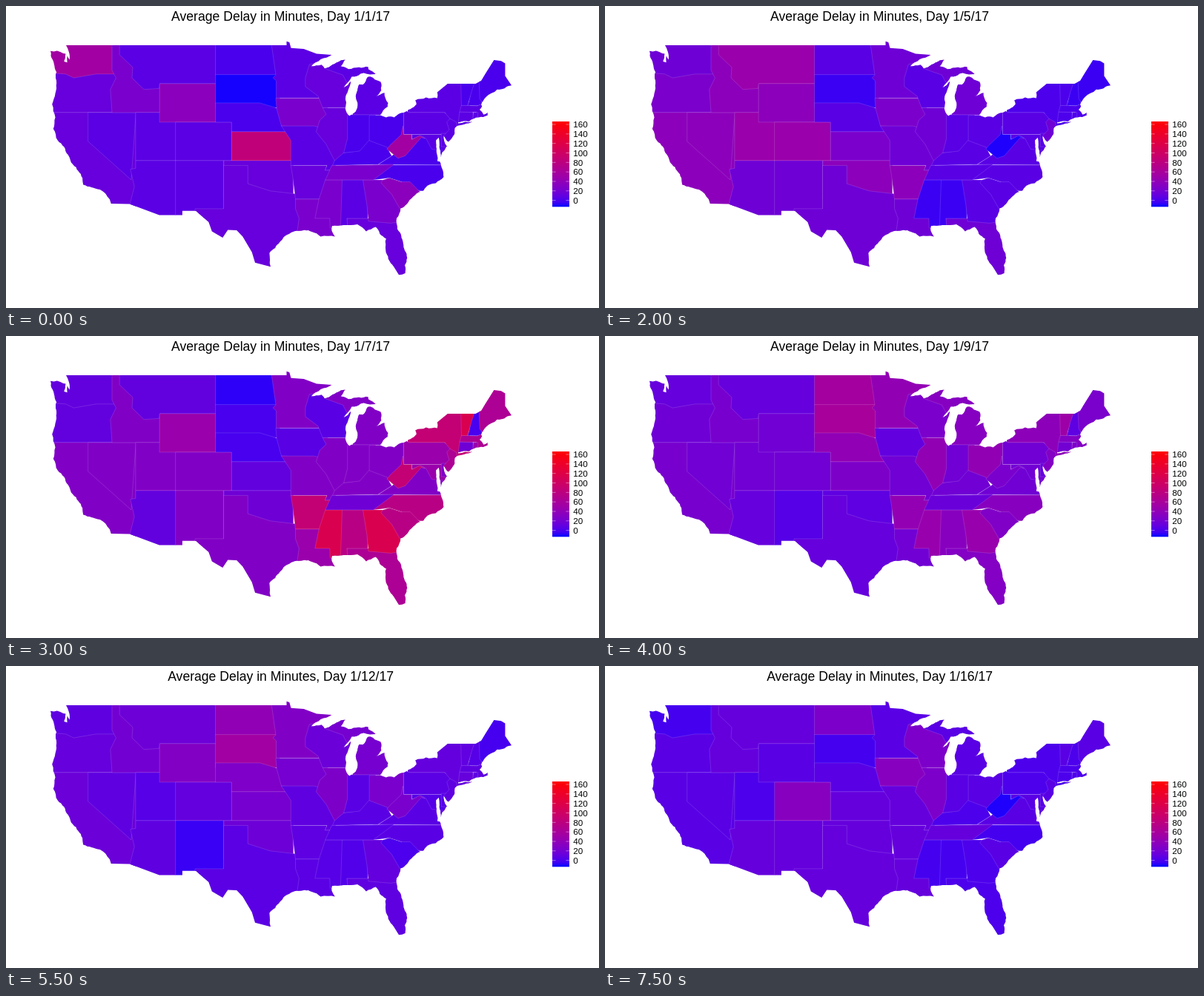
Animation, 800 px wide and 408 px high, one loop 8000 ms. Source, as an HTML page:

```html
<!DOCTYPE html>
<html lang="en">
<head>
<meta charset="utf-8">
<title>Average Delay in Minutes</title>
<style>
  html, body { margin: 0; width: 100%; height: 100%; overflow: hidden; background: #fff; }
  svg { display: block; width: 800px; height: 408px; }
  text { font-family: "Liberation Sans", Arial, sans-serif; fill: #000; }
  #title { font-size: 17.6px; text-anchor: middle; }
  #legend text { font-size: 11.73px; }
  #legend line { stroke: #fff; stroke-opacity: .6; stroke-width: .7; }
  #states path { stroke: #fff; stroke-opacity: .2; stroke-width: .7; stroke-linejoin: round; }
</style>
</head>
<body>
<svg viewBox="0 0 800 408">
  <defs>
    <clipPath id="land"><path id="outline"/></clipPath>
    <linearGradient id="ramp" x1="0" y1="1" x2="0" y2="0"></linearGradient>
  </defs>
  <text id="title" x="370.6" y="20"></text>
  <g id="states" clip-path="url(#land)"></g>
  <g id="legend"><rect x="737" y="156" width="23" height="115.3" fill="url(#ramp)"/></g>
</svg>
<script>
// Map points are "degrees west, degrees north". Shores get a seeded ragged line.
const edges = [
  ["shore", "124.7 48.4,123.1 48.15,122.8 48.1,123 47.3,122.6 47.2,122.6 47.9,122.3 47.5,122.4 48.3,122.75 49"],
  ["border", "122.75 49,95.15 49,95.15 49.4,94.8 49.3,94.6 48.7,93 48.6,91.4 48.1,89.5 48"],
  ["shore", "89.5 48,92.1 46.8,90.8 46.95,90.4 46.57,88.4 47.4,87.8 47.5,88.4 46.8,87.4 46.5,86.1 46.7,84.95 46.75,84.9 46.5,84 46"],
  ["shore", "84.7 45.95,85.5 46.1,87 45.75,88 44.6,87.1 45.25,87.75 43.7,87.8 42.4,87.3 41.62,86.5 42.1,86.25 43,86.5 43.7,86.1 44.9,85.6 44.9,85 45.7,84.7 45.75,83.4 45.2,83.3 44.3,83.9 43.7,82.9 44.05,82.45 43,82.5 42.6,83.45 41.72"],
  ["shore", "82.7 41.5,81.7 41.5,80.5 42,78.9 42.85,79.05 43.27,76.3 43.5,76.3 44.1"],
  ["border", "75 45,71.5 45,70.8 45.3,70.3 46,69.2 47.46,68.3 47.36,67.8 47.1,67.8 45.8,67 44.82"],
  ["shore", "67 44.82,68.8 44.4,70.2 43.6,70.8 42.85,70.7 42.65,71 42.3,70.5 41.78,70 42,70 41.7,71.1 41.5,73.65 41,73.7 40.87,71.9 41.05,73.9 40.57"],
  ["shore", "74.1 40.4,74.1 39.75,74.9 38.95,75.5 39.55,75.1 38.5,75.95 37.15,75.9 38,76.1 39.4,76.45 39.1,76.4 38.2,76.3 36.95,75.97 36.9,75.5 35.3,76.5 34.65,77.3 34.5,78 33.9,79.1 33.4,79.9 32.7,80.9 32.05,81.4 31,81.3 29.9,80.55 28.4,80.05 26.9,80.3 25.3,81.1 25.12"],
  ["shore", "81.75 26,82.75 27.7,82.7 28.9,84 30.1,85.2 29.65,86.3 30.38,88 30.3,89.5 30.2,89.5 29.7,89.1 29.1,90.9 29.1,92 29.6,93.8 29.7,94.8 29.4,96 28.55,97.3 27.4,97.15 25.97"],
  ["border", "97.15 25.97,99.1 26.4,99.5 27.5,100.65 29.1,101.4 29.77,102.5 29.8,103.15 29,104.5 29.65,104.9 30.6,106.5 31.78,108.2 31.78,108.2 31.33,111.07 31.33,114.8 32.5,117.12 32.53"],
  ["shore", "117.12 32.53,117.3 33,118.5 34,120.6 34.5,120.7 35.2,121.9 36.6,122.5 37.6,123.8 39.1,124.35 40.3,124.1 41.5,124.5 42.85,124.1 44,123.95 46.2,124.65 47.9,124.7 48.4"]
];

// Painted in order: a later state trims the loose edges of its neighbours.
// Two points are the corners of a box.
const states = {
  WA: "126 50,116 45",
  OR: "126 46.2,122.8 46,121.8 45.6,119 46,115 46,115 42,126 42",
  CA: "126 42,114 32",
  NV: "120 42,114 42,114.6 35,120 39",
  ID: "117 50,111 50,111 42,117 42,117.2 44.4,116.5 45.6,117 46.4",
  MT: "116.05 50,104 50,104 45,111 45,111.1 44.5,113 44.4,114.5 45.6,114.4 46.7,116.05 48",
  UT: "114.04 42,109 37",
  WY: "111.05 45,104 41",
  AZ: "114.04 37,109 37,109 31,114.8 31,114.7 32.7,114.2 34.3,114.7 36.1,114.04 36.2",
  CO: "109.05 41,102 37",
  NM: "109.05 37,103 31",
  ND: "104.05 50,96 45.9",
  SD: "104.05 45.94,96 42.5",
  NE: "104.05 43,98.5 43,96.5 42.5,95 42,95 40,102.05 40,102.05 41,104.05 41",
  KS: "102.05 40,94 37",
  OK: "103 37,94.3 33",
  TX: "103.04 36.5,100 36.5,100 34.6,97.2 33.85,94 33.55,93 33,93 25,107 25,107 30,106.6 32,103.04 32",
  MN: "97.2 50,96.5 45.9,96.85 45.6,96.45 45.3,96.45 43.5,91 43.5,88 47.5,88 50",
  IA: "96.5 43.5,90 43.5,90 40.4,95.8 40.6,96.4 42.4",
  MO: "95.8 40.6,91.7 40.6,89 40,89 36,90.4 36,90.1 36.5,94.62 36.5,94.62 39.1",
  AR: "94.62 36.5,90.1 36.5,90.35 36,89.5 36,91 33,94.04 33,94.4 35.4",
  LA: "94.04 33,90 33,88 30,88 28.5,94 28.5,93.6 31,94.04 32",
  WI: "92.3 47,92.8 45.6,92.8 44.7,91.2 43.7,90.65 42.5,86 42.5,86 46,89 47.5",
  IL: "90.65 42.5,87 42.5,87 37,89.15 37,90.2 38.7,91.45 40,91 41.2,90.2 41.8",
  MI: "90.4 46.57,88.1 45.9,87.6 45.1,86.9 45.4,86.9 41.76,83.4 41.73,82 42,82 47.8,88 47.6,90 47.1",
  IN: "87.53 41.76,84 41.76,84 38,88 37.8,87.53 39.3",
  OH: "84.8 41.7,83.4 41.73,82 42.3,80.5 42.3,80.5 38,84.8 38",
  NC: "84.3 36.55,75 36.55,75 33.8,78.55 33.86,80.8 34.8,82.3 35.2,84.3 35",
  FL: "87.6 31,79 25",
  MS: "90.3 35,88 35,88 30,89.7 30,89.75 31,91.6 31,91.1 33",
  AL: "88.2 35,85 35,85 31,87.6 31,87.5 30,88.4 30",
  GA: "85.6 35,83 35,80 32,80.5 30.72,82.1 30.5,84.9 30.7,85.1 32.4",
  SC: "83.1 35,82.3 35.2,80.8 34.8,79.7 34.8,78.4 33.7,80.9 31.9,82 33.5,83.35 34.7",
  VA: "83.7 36.59,82 37.5,78.3 39.7,75 38,75 36.55",
  KY: "89.4 36.5,89.15 37,88 37.8,86 38,84.85 39.1,82.6 38.4,82 37.5,83.7 36.6",
  TN: "89.5 36.5,81.7 36.6,84.3 35,90.3 35",
  NY: "80 42,79.9 43.5,76 45.3,73.3 45.1,71.5 41.2,71.5 40.4,74.3 40.4,75.35 42",
  PA: "80.52 42.3,79.76 42,75.35 42,74.7 41.35,74.8 39.72,80.52 39.72",
  MD: "79.48 39.72,75.79 39.72,75 38.45,75 38,77 38.2,77.7 39.3,78.3 39.6,79.48 39.2",
  DE: "75.79 39.83,75 38.45",
  NJ: "74.7 41.36,73.9 41,73.8 40.3,74.8 38.7,75.5 39.6,74.8 40.2,75.1 41",
  WV: "82.6 38.2,81.2 37.25,80.3 37.5,78.3 39.4,77.8 39.3,78.5 39.6,79.48 39.2,79.48 39.72,80.52 39.72,80.6 40.6,80.8 39.7,82.2 38.6",
  MA: "73.5 42.05,73.27 42.75,71.3 42.7,70.5 43,69.5 42.9,69.5 41.2,71.2 41.4,71.4 42.03",
  CT: "73.5 42.05,71.8 42.02,71.85 41.2,73.66 40.95",
  RI: "71.8 42.02,71.2 41.3",
  VT: "73.35 45.2,71.5 45.2,72.5 42.73,73.27 42.73",
  NH: "71.5 45.4,70.9 45.4,70.7 42.87,71.3 42.7,72.46 42.73,72 44.2",
  ME: "71.08 45.4,70.97 43.4,70.5 42.9,66 44,66 48,71 48"
};

// Minutes of delay by day: a level for all, then the states that stand out.
// The days between are blended.
const levels = {
  1: "7 all,-12 SD,0 ND NE KY IN OH NH VT ME NC VA,13 CA OR TX FL AR WI OK IL,24 ID GA MS IA TN LA,36 WY SC,55 WA WV,85 KS",
  3: "12 all,-3 MS,6 WA NE MN CT OK NM UT KS RI,18 ID AZ SD MI IN OH NH ME WI DE PA,28 OR WY CO IA IL AL AR VT,35 CA NV MT,46 NJ",
  5: "6 all,-11 WV,-5 SD MS AL NH ME,1 NY CT VT RI MA,17 AZ NM TX MN LA MI NJ FL IL WA MO,25 OR IA KS,37 CA NV ID WY OK AR,48 MT UT CO",
  7: "29 all,-8 ND,-1 SD NE NH,6 IA WI,11 WA OR AZ MT KS,17 OK CT TN,48 WY LA PA MD RI,65 FL NJ ME MA,76 AL SC NC,88 NY AR WV,114 MS GA VT",
  10: "13 all,-8 NM WV,4 WY OK TX LA SC MD DE PA ME,20 OR CA ID AR CT VT,34 KS WI MI,48 MN IL OH,62 NE,90 ND SD",
  14: "5 all,-7 ND NE ME AL,-3 UT NM WI AR MS SC NH TN,0 IN OH KY NC VA VT,10 CA CO TX LA MN GA MI NY PA KS,20 ID MT SD,29 OK IA,56 WY WV",
  16: "6 all,-11 WV,-2 WA SD MS AL NC,1 UT FL GA KY PA NY CT RI MA NH,12 ID MT NM OK TX AR LA AZ TN KS MO,26 ND WI IL,33 CO IA"
};

const $ = id => document.getElementById(id);

function add(parent, tag, attrs, text = "") {
  const el = document.createElementNS("http://www.w3.org/2000/svg", tag);
  for (const key in attrs) el.setAttribute(key, attrs[key]);
  el.textContent = text;
  return parent.appendChild(el);
}

let seed = 7;
function random() {
  seed = seed * 16807 % 2147483647;
  return seed / 2147483647;
}

function project(text) {
  return text.split(",").map(p => {
    const [west, north] = p.split(" ").map(Number);
    return [60 + (124.7 - west) * 10.78, 52.9 + (49 - north) * 13];
  });
}

function pathOf(points) {
  return "M" + points.map(p => p.map(v => v.toFixed(1))).join("L") + "Z";
}

// Shift each midpoint sideways until the pieces are short.
function ragged(a, b) {
  const dx = b[0] - a[0], dy = b[1] - a[1];
  if (Math.hypot(dx, dy) < 5) return [a];
  const k = (random() - .5) * .2;
  const mid = [(a[0] + b[0]) / 2 - dy * k, (a[1] + b[1]) / 2 + dx * k];
  return [...ragged(a, mid), ...ragged(mid, b)];
}

function edge([kind, text]) {
  const points = project(text);
  if (kind === "border") return points;
  return points.flatMap((p, i) => i + 1 < points.length ? ragged(p, points[i + 1]) : [p]);
}

function region(text) {
  const points = project(text);
  if (points.length > 2) return points;
  const [[left, top], [right, bottom]] = points;
  return [[left, top], [right, top], [right, bottom], [left, bottom]];
}

// Blue at -13 minutes to red at 166 minutes.
const low = -13, high = 166;
function shade(delay) {
  const t = Math.min(1, Math.max(0, (delay - low) / (high - low)));
  return `rgb(${Math.round(255 * t ** .47)},0,${Math.round(255 * (1 - t) ** .95)})`;
}

const delays = {};
for (const day in levels) {
  delays[day] = {};
  for (const group of levels[day].split(",")) {
    const [level, ...names] = group.split(" ");
    for (const name of names) delays[day][name] = +level;
  }
}
const keyDays = Object.keys(delays).map(Number);

function delayOn(day, name) {
  const i = Math.max(1, keyDays.findIndex(d => d >= day));
  const [from, to] = [keyDays[i - 1], keyDays[i]];
  const [a, b] = [from, to].map(d => delays[d][name] ?? delays[d].all);
  return a + (b - a) * (day - from) / (to - from);
}

$("outline").setAttribute("d", pathOf(edges.flatMap(edge)));

const paths = {};
for (const name in states) {
  paths[name] = add($("states"), "path", { d: pathOf(region(states[name])) });
}

for (let i = 0; i <= 20; i++) {
  add($("ramp"), "stop", { offset: i / 20, "stop-color": shade(low + (high - low) * i / 20) });
}
for (let v = 0; v <= 160; v += 20) {
  const y = 262.6 - v * .641;
  add($("legend"), "line", { x1: 737, x2: 741.6, y1: y, y2: y });
  add($("legend"), "line", { x1: 755.4, x2: 760, y1: y, y2: y });
  add($("legend"), "text", { x: 765.3, y: y + 4.2 }, v);
}

let shown = 0;
function show(day) {
  if (day === shown) return;
  shown = day;
  $("title").textContent = `Average Delay in Minutes, Day 1/${day}/17`;
  for (const name in paths) paths[name].setAttribute("fill", shade(delayOn(day, name)));
}

const start = performance.now();
function frame() {
  const time = (performance.now() - start) % 8000;
  show(1 + Math.floor(time / 500));
  requestAnimationFrame(frame);
}
frame();
</script>
</body>
</html>
```
